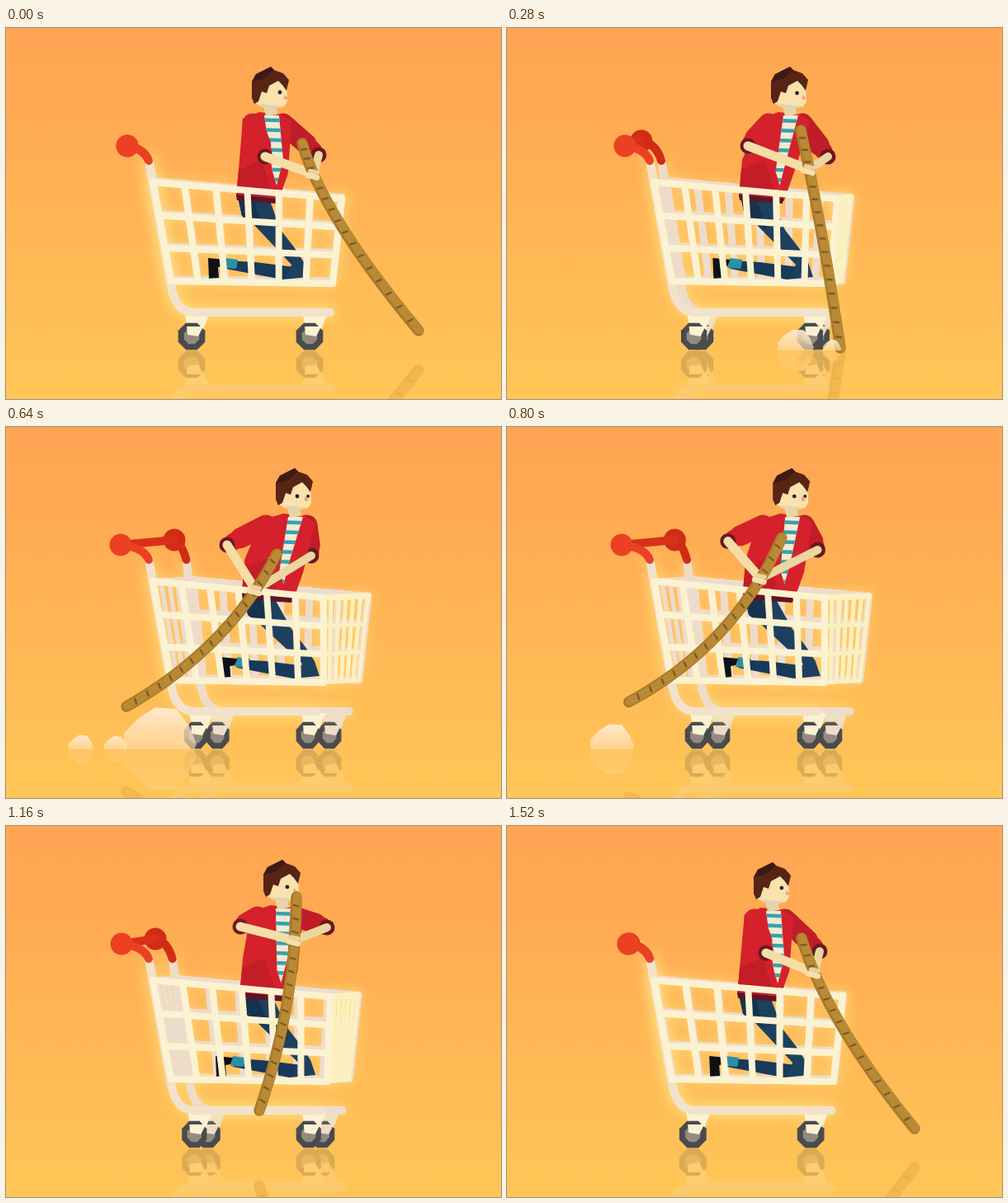
Write an HTML page with a canvas that moves like this. It is 600 px wide and 450 px high and loops after 1560 ms.

```html
<!DOCTYPE html>
<html lang="en">
<head>
<meta charset="utf-8">
<title>Paddling a shopping cart</title>
<style>
html, body { margin: 0; width: 100%; height: 100%; overflow: hidden; background: #ffb553; }
canvas { display: block; }
</style>
</head>
<body>
<canvas id="stage" width="600" height="450"></canvas>
<script>
const LOOP = 1560, STEP = 40, GROUND = 391;
const stage = document.getElementById('stage').getContext('2d');
const layer = document.createElement('canvas');
layer.width = 600;
layer.height = 450;
const c = layer.getContext('2d');

// Pose keys, one value per time; joined by a smooth periodic curve.
const TIMES = [0, 280, 440, 640, 960, 1160, 1520];
const POSE = {
  turn: [0, 20, 43, 65, 55, 41, 1],
  headX: [320, 342, 347, 349, 338, 334, 321], headY: [75, 75, 76, 78, 76, 69, 72],
  nearX: [314, 292, 279, 268, 273, 284, 314], nearY: [156, 143, 134, 143, 130, 122, 154],
  farX: [379, 389, 389, 370, 388, 389, 379], farY: [154, 156, 155, 156, 138, 123, 152],
  topX: [359, 356, 346, 328, 344, 352, 357], topY: [140, 124, 118, 154, 102, 86, 136],
  midX: [407, 381, 340, 254, 295, 340, 407], midY: [241, 248, 246, 257, 234, 217, 245],
  tipX: [500, 404, 326, 146, 216, 307, 494], tipY: [367, 388, 378, 339, 339, 345, 367]
};
// Dust puffs: [time, x, radius]
const PUFFS = [
  [[200, 400, 0], [280, 350, 22], [440, 223, 37], [640, 91, 15], [720, 50, 0]],
  [[230, 420, 0], [280, 394, 11], [440, 315, 17], [640, 187, 44], [960, 68, 9], [1040, 45, 0]],
  [[300, 372, 0], [440, 268, 20], [640, 133, 14], [720, 85, 0]]
];

const mix = (a, b, k) => a + (b - a) * k;
const mixPt = (p, q, k) => [mix(p[0], q[0], k), mix(p[1], q[1], k)];

function sample(values, t) {
  const n = TIMES.length;
  const time = i => TIMES[(i + n) % n] + LOOP * Math.floor(i / n);
  const value = i => values[(i + n) % n];
  const rate = i => (value(i + 1) - value(i)) / (time(i + 1) - time(i));
  const slope = i => {
    const before = time(i) - time(i - 1), after = time(i + 1) - time(i);
    return (rate(i - 1) * after + rate(i) * before) / (before + after);
  };
  let i = n - 1;
  while (t < TIMES[i]) i--;
  const h = time(i + 1) - time(i), u = (t - time(i)) / h, v = 1 - u;
  return v * v * ((1 + 2 * u) * value(i) + u * h * slope(i)) +
         u * u * ((3 - 2 * u) * value(i + 1) - v * h * slope(i + 1));
}

function trace(points, close) {
  c.beginPath();
  points.forEach(p => c.lineTo(...p));
  if (close) c.closePath();
}
function poly(color, ...points) {
  trace(points, true);
  c.fillStyle = color;
  c.fill();
}
function line(color, width, ...points) {
  trace(points);
  c.strokeStyle = color;
  c.lineWidth = width;
  c.stroke();
}
function disc(color, x, y, r) {
  c.beginPath();
  c.arc(x, y, r, 0, 7);
  c.fillStyle = color;
  c.fill();
}
function glow(color, blur) {
  c.shadowColor = color;
  c.shadowBlur = blur;
}

// Wire panel between two side edges, each given as [top, bottom].
function grid(left, right, cols, color, barWidth, rimWidth) {
  c.beginPath();
  const bar = (p, q) => { c.moveTo(...p); c.lineTo(...q); };
  for (let i = 0; i <= cols; i++)
    bar(mixPt(left[0], right[0], i / cols), mixPt(left[1], right[1], i / cols));
  for (const k of [.335, .665, 1])
    bar(mixPt(left[0], left[1], k), mixPt(right[0], right[1], k));
  c.strokeStyle = color;
  c.lineWidth = barWidth;
  c.stroke();
  line(color, rimWidth, left[0], right[0]);
}

function rail(color, topX, bottomX, endX) {
  c.beginPath();
  c.moveTo(topX, 160);
  c.lineTo(bottomX, 312);
  c.quadraticCurveTo(bottomX + 5, 344, bottomX + 27, 345);
  c.lineTo(endX, 345);
  c.strokeStyle = color;
  c.lineWidth = 10;
  c.stroke();
}

function wheel(x, squash, legColor) {
  poly(legColor, [x - 8, 347], [x + 21, 347], [x + 11, 374], [x - 4, 372]);
  const ring = (r, color) => poly(color, ...Array.from({ length: 8 }, (_, i) => {
    const a = (i + .5) * Math.PI / 4;
    return [x + r * squash * Math.cos(a), 374 + r * Math.sin(a)];
  }));
  ring(17.5, '#494b4e');
  ring(10, '#938b80');
  poly(legColor, [x - 6, 362], [x + 14, 362], [x + 8, 374], [x - 5, 372]);
}

function handle(knobX, knobY, jointX, color) {
  c.beginPath();
  c.moveTo(knobX, knobY);
  c.quadraticCurveTo(jointX - 5, knobY + 3, jointX + 1, 161);
  c.strokeStyle = color;
  c.lineWidth = 10;
  c.stroke();
  disc(color, knobX, knobY, 13.5);
}

function legs(d) {
  const at = (x, y) => [x + d * (x < 300 ? .22 : .2) * (y > 240 ? 1 : .5), y];
  poly('#17395a', at(265, 282), at(302, 284), at(350, 290), at(367, 302), at(335, 305), at(266, 292));
  poly('#1d405f', at(281, 205), at(320, 210), at(333, 245), at(350, 267), at(361, 284),
    at(367, 302), at(340, 302), at(346, 287), at(300, 238), at(286, 228));
  poly('#17324c', at(281, 205), at(300, 206), at(311, 244), at(300, 238), at(286, 228));
  poly('#2b90a5', at(266, 279), at(281, 281), at(279, 292), at(263, 291));
  poly('#0f1118', at(245, 279), at(266, 281), at(263, 289), at(257, 290), at(258, 303), at(246, 304));
}

function sleeve(shoulder, elbow, color) {
  line(color, 25, shoulder, mixPt(shoulder, elbow, .65));
  line(color, 21, shoulder, mixPt(shoulder, elbow, .85));
  disc('#6b1820', ...elbow, 9.5);
}

function head(x, y, k) {
  const at = (px, py) => [x + px, y + py];
  poly('#e6d5a8', at(-9, 16), at(7, 18), at(9, 30), at(-5, 32));
  poly('#f9e2ab', at(-18, 16), at(-14, 0), at(0, -12), at(20, -10), at(21, 14), at(17, 20), at(5, 23), at(-9, 21));
  poly('#dfd2b5', at(-13, 17), at(15, 20), at(5, 23), at(-9, 21));
  poly('#572415', at(-22, 10), at(-22, -10), at(-17, -19), at(1, -28), at(5, -24), at(16, -20),
    at(23, -12), at(20, 1), at(15, -6), at(10, -11), at(-1, -5), at(-4, 4), at(-10, 2), at(-14, 14), at(-19, 17));
  poly('#3d1a17', at(-22, -10), at(-17, -19), at(1, -28), at(5, -24), at(-8, -13));
  poly('#f49b78', at(18 - 5 * k, 6), at(22 - 4 * k, 11), at(17 - 4 * k, 12));
  disc('#23222a', x + 12 - 8 * k, y + 3 + 3 * k, 2.4);
  if (k > .7) disc('#23222a', x + 17, y + 6, 2);
}

function body(p, d) {
  const x = p.headX, y = p.headY;
  const near = [x - 21 - d * .2, y + 41], far = [x + 16, y + 41];
  const nearElbow = [p.nearX, p.nearY], farElbow = [p.farX, p.farY];
  const hipL = 280 + d * .1, hipR = 330 + d * .28;
  const hand = breadAt(p, .2);

  legs(d);
  sleeve(far, farElbow, '#c01d28');
  poly('#d4212b', [x - 13, y + 27], [x - 33 - d * .1, y + 35], [hipL + 3, 160], [hipL - 1, 205],
    [hipR, 210], [hipR + 12, 176], [x + 26, y + 38], [x + 13, y + 30]);
  poly('#c31d28', [hipL + 2, 172], [hipL + 30, 160], [hipL + 44, 205], [hipL - 1, 205]);
  poly('#5c1525', [hipL - 1, 202], [hipR, 207], [hipR - 2, 213], [hipL, 209]);

  c.save();
  const neck = x + 2, hem = 327 + d * .13;
  const shirt = [[neck - 9, y + 31], [neck + 9, y + 31], [hem + 9, 160], [hem + 1, 191], [hem - 4, 174]];
  poly('#f3ead1', ...shirt);
  trace(shirt, true);
  c.clip();
  for (let sy = y + 37; sy < 195; sy += 12)
    line('#38a1ae', 4.5, [300, sy - 1], [380, sy + 2]);
  c.restore();

  head(x, y, d / 65);
  line('#ecd69f', 10, farElbow, hand);
  sleeve(near, nearElbow, '#d4212b');
  line('#f5dea6', 11, nearElbow, hand);
}

function breadAt(p, s) {
  const ctrl = (m, a, b) => 2 * m - (a + b) / 2;
  const bend = (a, m, b) => mix(mix(a, ctrl(m, a, b), s), mix(ctrl(m, a, b), b, s), s);
  return [bend(p.topX, p.midX, p.tipX), bend(p.topY, p.midY, p.tipY)];
}

function bread(p) {
  const spine = Array.from({ length: 31 }, (_, i) => breadAt(p, i / 30));
  line('#a97a29', 13.5, ...spine);
  line('#b98a35', 10, ...spine.map(([x, y]) => [x + 1, y - .5]));
  for (let i = 0; i < 16; i++) {
    const s = .04 + i * .061;
    const [x, y] = breadAt(p, s), [nx, ny] = breadAt(p, s + .01);
    const a = Math.atan2(ny - y, nx - x) - 1.35;
    const dx = 3 * Math.cos(a), dy = 3 * Math.sin(a);
    line('#805a28', 2.4, [x - dx, y - dy], [x + dx, y + dy]);
  }
  const [hx, hy] = breadAt(p, .2);
  line('#f7dfaa', 7, [hx - 7, hy + 1], [hx + 4, hy + 4]);
  line('#ead39e', 5, [hx - 4, hy - 4], [hx + 5, hy - 2]);
}

function puff(keys, t) {
  const i = keys.findIndex(k => k[0] > t);
  if (i < 1) return;
  const a = keys[i - 1], b = keys[i], k = (t - a[0]) / (b[0] - a[0]);
  const x = mix(a[1], b[1], k), r = mix(a[2], b[2], k);
  const haze = c.createLinearGradient(0, GROUND - r * 1.2, 0, GROUND);
  haze.addColorStop(0, 'rgba(255,236,212,.97)');
  haze.addColorStop(1, 'rgba(255,222,178,.6)');
  poly(haze, ...Array.from({ length: 11 }, (_, j) => {
    const q = r * (1 + .07 * Math.sin(j * 4.3)), ang = j * Math.PI * 2 / 11;
    return [x + q * Math.cos(ang), GROUND - r * .15 + q * Math.sin(ang)];
  }));
}

function scene(t) {
  const p = {};
  for (const key in POSE) p[key] = sample(POSE[key], t);
  const d = Math.max(0, p.turn), squash = 1 - d / 600;
  const nearL = [[178, 187], [200, 307]], nearR = [[407 - d * .34, 207], [396 - d * .17, 310]];
  const farL = [[178 + d * .75, 185], [200 + d * .6, 305]];
  const farR = [[nearR[0][0] + d * .83, 205], [nearR[1][0] + d * .66, 307]];
  const rear = 225 + d * .08, front = 368 - d * .03, endX = 393 - d * .25;
  const knobX = 139 + 8 * (1 - d / 65) ** 2, knobY = 143;
  const farKnobY = knobY - 6 * Math.min(1, d / 20);
  const cream = '#fbf2d2', shade = '#eedccb';

  const nearSide = () => {
    rail('#f2e2cb', 173, 200, endX);
    grid(nearR, farR, 6, '#fcf0c0', 4.5, 7);
    grid(nearL, nearR, 6, cream, 8, 8);
  };

  c.clearRect(0, 0, 600, 450);
  c.lineCap = c.lineJoin = 'round';

  wheel(rear + d * .4, squash, shade);
  wheel(front + d * .4, squash, shade);
  glow('rgba(255,240,150,.6)', 18);
  nearSide();
  rail(shade, 173 + d * .7, 200 + d * .55, endX + d * .6);
  glow('transparent', 0);
  grid(farL, farR, 6, shade, 9, 8);
  grid(nearL, farL, 5, shade, 5.5, 7);
  handle(knobX + d, farKnobY, 172 + d * .7, '#d02c15');
  line('#d93119', 10, [knobX, knobY], [knobX + d, farKnobY]);

  body(p, d);

  wheel(rear, squash, cream);
  wheel(front, squash, cream);
  nearSide();
  handle(knobX, knobY, 172, '#ec4024');

  bread(p);

  c.save();
  c.beginPath();
  c.rect(0, 0, 600, GROUND);
  c.clip();
  PUFFS.forEach(keys => puff(keys, t));
  c.restore();
}

const sky = stage.createLinearGradient(0, 0, 0, 450);
sky.addColorStop(0, '#ffa453');
sky.addColorStop(.25, '#ffab53');
sky.addColorStop(1, '#ffc657');

function frame(now) {
  scene(Math.floor(now % LOOP / STEP) * STEP);
  stage.fillStyle = sky;
  stage.fillRect(0, 0, 600, 450);
  stage.save();
  stage.beginPath();
  stage.rect(0, GROUND, 600, 450 - GROUND);
  stage.clip();
  stage.globalAlpha = .2;
  stage.translate(0, 2 * GROUND);
  stage.scale(1, -1);
  stage.drawImage(layer, 0, 0);
  stage.restore();
  stage.drawImage(layer, 0, 0);
  requestAnimationFrame(frame);
}
requestAnimationFrame(frame);
</script>
</body>
</html>
```
